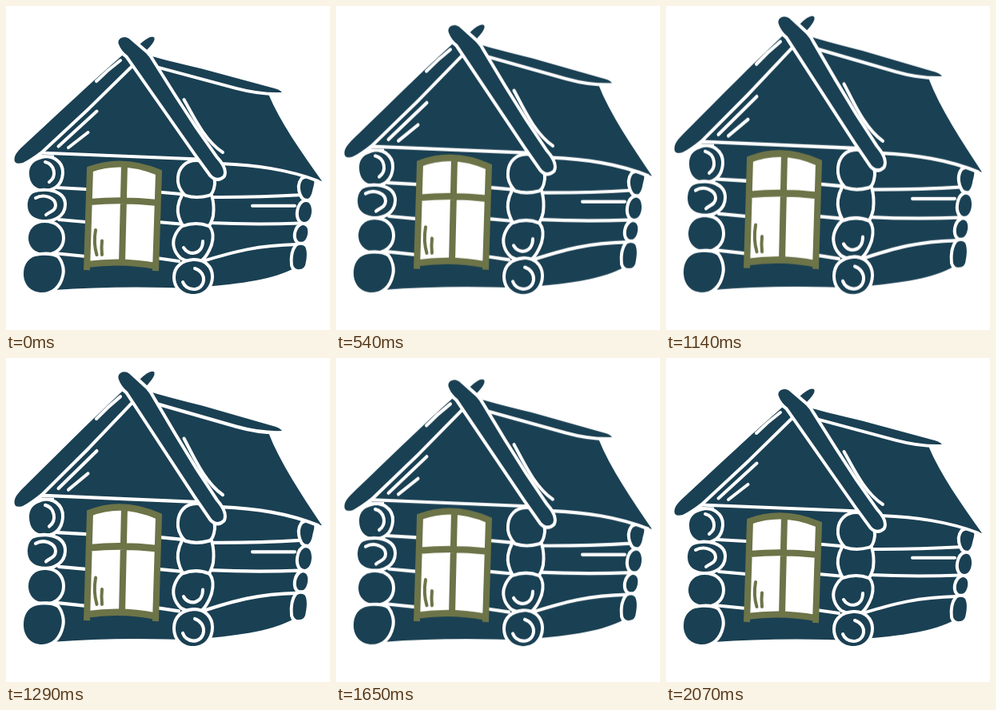
Write an HTML page that moves like this. It is 405 px wide and 405 px high and loops after 2.1 s.

```html
<!DOCTYPE html>
<html lang="en">
<head>
<meta charset="utf-8">
<title>Log cabin</title>
<style>
  html, body { margin: 0; width: 100%; height: 100%; overflow: hidden; background: #fff; }
  svg { display: block; width: 100%; height: 100%; }
  .cabin { fill: #1a4053; transform-origin: 0 359px; animation: stretch 2100ms linear infinite; }
  .edged path { stroke: #fff; stroke-width: 8; stroke-linejoin: round; paint-order: stroke; }
  .lines { fill: none; stroke: #fff; stroke-width: 4; stroke-linecap: round; }
  .frame { fill: none; stroke: #6c7448; stroke-width: 8; }
  .frame .glint { stroke-width: 4; stroke-linecap: round; }
  @keyframes stretch {
    0%, 98.571%, 100% { transform: scaleY(1); }
    49.286% { transform: scaleY(1.09); }
  }
</style>
</head>
<body>
<svg viewBox="0 0 405 405">
  <g class="cabin">
    <!-- walls -->
    <path d="M60 186H240V353Q140 349 60 355Z"/>
    <path d="M236 190L376 206V238L371 275L360 328C335 341 300 347 236 352Z"/>
    <g class="lines">
      <path d="M64 227L100 229M190 232.5L218 235M66 267L100 270M190 270L218 272.5M60 309L100 313M188 315L216 319"/>
      <path d="M254 239Q310 239.5 372 236M308 249.7H361M254 271Q310 273.5 368 271.5M246 319C285 307 315 299 364 298"/>
    </g>

    <!-- log ends -->
    <g class="edged">
      <path d="M42 192C56 186 70 196 69 209C68 223 59 229 47 229C36 229 29 221 29 209C29 200 34 194 42 192Z"/>
      <path d="M34 234C48 229 72 232 72 248C72 262 58 268 46 267C34 266 27 260 27 249C27 243 29 237 34 234Z"/>
      <path d="M48 271C62 271 70 279 70 290C70 302 60 309 48 309C36 309 28 301 28 290C28 279 36 271 48 271Z"/>
      <path d="M36 313C46 311 58 311 64 315C69 321 71 330 69 337C66 350 57 358 45 358C31 358 22 348 22 335C22 324 27 316 36 313Z"/>

      <path d="M222 237Q238 240 255 237C258 246 258 254 257 262Q255 270 252 274H223C218 266 216 258 217 251Q218 244 222 237Z"/>
      <path d="M238 195C250 196 260 210 259 222C258 230 256 234 253 235Q238 239 225 235C219 229 216 222 217 214C218 203 226 195 238 195Z"/>
      <path d="M221 277Q238 271 253 277C258 283 257 291 255 298C252 306 248 313 243 317Q232 320 220 314C212 307 209 297 213 288Q216 281 221 277Z"/>
      <path d="M234 319C247 318 256 327 256 338C256 351 247 360 234 360C221 360 212 351 212 339C212 327 221 320 234 319Z"/>

      <path d="M371 217Q378 213 385 217C386 222 384 226 383 231C382 236 380 240 377 241Q372 241 370 236C367 229 367 222 371 217Z"/>
      <path d="M374 245C379 244 382 249 382 256C382 264 378 270 373 270C368 270 365 264 366 257C367 250 370 246 374 245Z"/>
      <path d="M371 274C376 274 378 279 377 285C376 291 373 295 369 295C364 295 362 290 363 284C364 279 367 275 371 274Z"/>
      <path d="M364 300Q370 297 374 301C377 307 376 316 374 324Q372 329 367 329Q361 330 359 324C358 315 359 306 364 300Z"/>
    </g>
    <g class="lines">
      <path d="M49 195C61 198 64 213 54 220M37 240C48 234 62 240 62 249C62 256 55 257 50 261"/>
      <path d="M222 302C228 313 246 311 246 294M236 328C252 333 250 354 234 354Q224 353 221 345"/>
    </g>

    <!-- right roof -->
    <path d="M180 70L328 110C343 146 369 182 395 219Q345 201 262 198Z"/>
    <path class="lines" d="M268 197C312 199 352 204 391 219" style="stroke-linecap:butt"/>
    <g class="edged">
      <path d="M180 62Q192 66 245 78.5L332 102Q342 104 345 108Q318 109 288 101L180 72Z"/>
    </g>

    <!-- gable -->
    <path d="M152 66L44 186L240 191L256 214Z"/>
    <path class="lines" d="M42 183.5L242 191.5"/>

    <!-- crossed planks -->
    <g class="edged">
      <path d="M10.5 191C11 184 18 178 30 167C70 130 108 94 145 62L167 48Q180 36 185 39Q188 43 176 55L156 74L102 127L44 181Q31 191 21 196Q10 199 10.5 191Z"/>
      <path d="M141 48C138 41 147 36 154 41L175 59Q180 64 183 70L210 113L236 153L262 190Q275 204 271 212Q264 218 257 211L238 185L152 62Q144 56 141 48Z"/>
    </g>
    <g class="lines">
      <path d="M113 94Q127 80 143 68M65.5 175.5L113.5 131.5M78 177L102.5 158M222.5 117C234 137 248 168 271 183"/>
    </g>

    <!-- window -->
    <path fill="#fff" d="M105 204Q146 189 191 208L187 324Q145 318 101 323Z"/>
    <g class="frame">
      <path d="M101 330L105 204Q146 189 191 208L187 331M101 323Q145 317 187 325M148 198L145 321M104 245Q146 241 190 246"/>
      <path class="glint" d="M112 280Q109 297 113.5 311M120 293.5Q119 302 120 311"/>
    </g>
  </g>
</svg>
</body>
</html>
```
